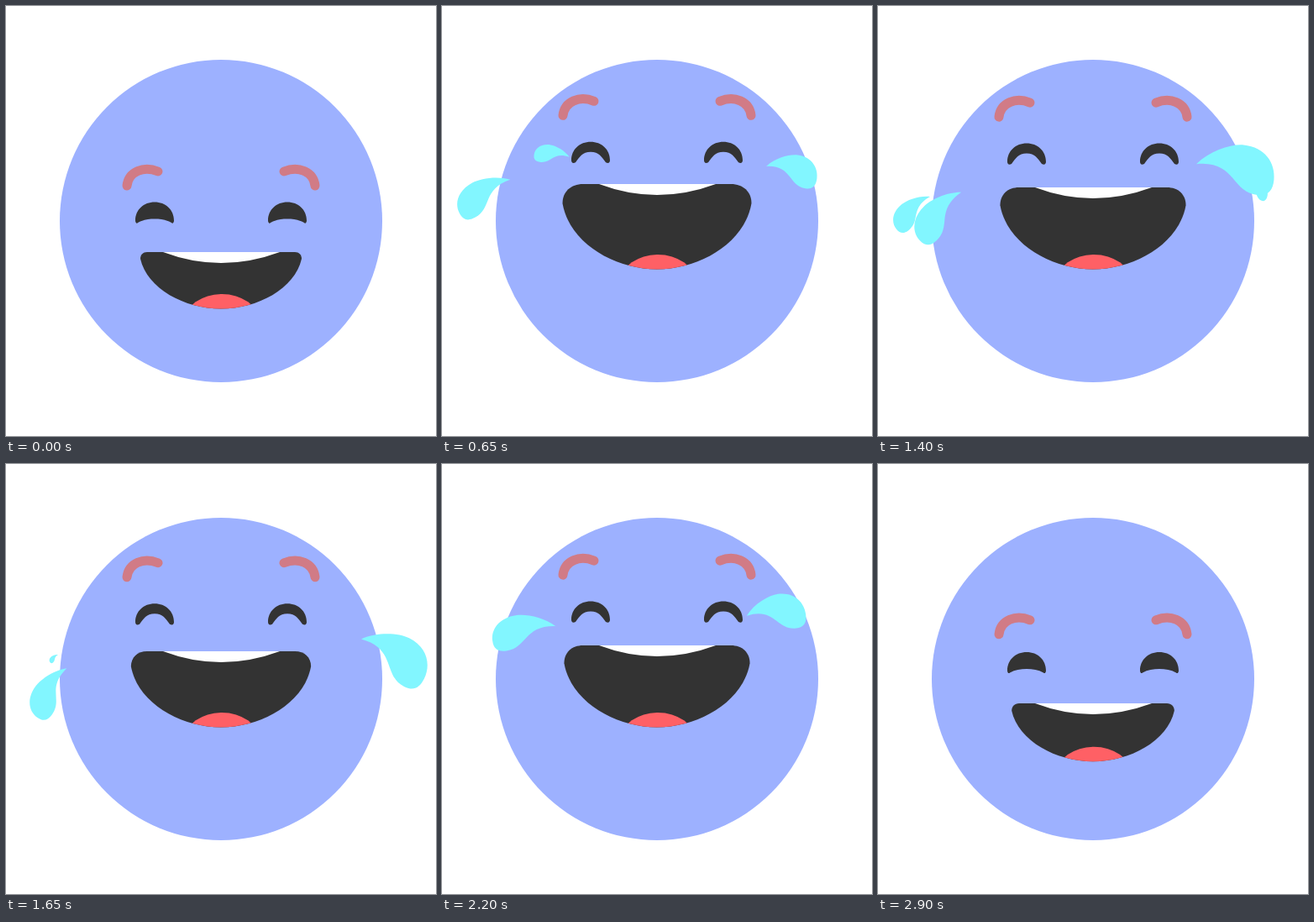
Recreate the animation shown at these times as an HTML page. Size 512x512 px, loop 2.95 s.

```html
<!DOCTYPE html>
<html lang="en">
<head>
<meta charset="utf-8">
<title>Laughing face</title>
<style>
  html, body { margin: 0; width: 100%; height: 100%; overflow: hidden; background: #fff; }
  svg { display: block; width: 100%; height: 100%; }
</style>
</head>
<body>
<svg viewBox="0 0 512 512">
  <defs>
    <clipPath id="mouthClip"><path id="mouthShape"/></clipPath>
    <path id="drop" d="M0 0C15-18 40-28 54-28C80-28 94-10 94 10C94 24 88 30 76 30C45 30 46-9 0 0Z"/>
    <g id="half">
      <path id="brow" d="M144 214C146 197 164 190 181 197" fill="none" stroke="#d17b86" stroke-width="11" stroke-linecap="round"/>
      <path id="eye" fill="#333"/>
    </g>
  </defs>
  <circle cx="256" cy="256" r="192" fill="#9db1ff"/>
  <use href="#half"/>
  <use href="#half" transform="matrix(-1 0 0 1 512 0)"/>
  <use href="#mouthShape" fill="#333"/>
  <g clip-path="url(#mouthClip)">
    <path id="teeth" d="M187 0Q256 26 326 0Z" fill="#fff"/>
    <ellipse id="tongue" cx="257" cy="14.5" rx="44" ry="32" fill="#ff6065"/>
  </g>
  <g id="tears" fill="#82f6ff"></g>
</svg>
<script>
const LOOP = 2950, STEP = 50;
const LAUGH_START = 300, LAUGH_END = 2300, LAUGH_PERIOD = 400;
const EYE_CORNER = { out: 103, y: 179 };
const LEFT = { side: -1, turn: 1.4, slim: .85 };
const RIGHT = { side: 1, turn: 1.1, slim: 1 };

const $ = id => document.getElementById(id);
const mix = (a, b, u) => a + (b - a) * u;
const clamp = u => Math.min(1, Math.max(0, u));
const ease = (t, from, to) => {
  const u = clamp((t - from) / (to - from));
  return u * u * (3 - 2 * u);
};
const shift = (id, y) => $(id).setAttribute("transform", `translate(0 ${y})`);

function makeTear(eye, { birth, life, reach, fall, size = .82 }) {
  const node = document.createElementNS("http://www.w3.org/2000/svg", "use");
  node.setAttribute("href", "#drop");
  $("tears").append(node);
  return { ...eye, node, birth, life, reach, fall, size };
}

const tears = [
  makeTear(LEFT, { birth: 150, life: 1000, reach: 83, fall: 32 }),
  makeTear(LEFT, { birth: 600, life: 1100, reach: 91, fall: 48 }),
  makeTear(LEFT, { birth: 900, life: 1280, reach: 83, fall: 66 }),
  makeTear(LEFT, { birth: 2080, life: 680, reach: 97, fall: 78 }),
  makeTear(RIGHT, { birth: 350, life: 1200, reach: 82, fall: 36, size: .66 }),
  makeTear(RIGHT, { birth: 1200, life: 900, reach: 74, fall: 34, size: 1 }),
  makeTear(RIGHT, { birth: 2150, life: 620, reach: 89, fall: 41, size: .77 })
];

// A tear pops out at the eye corner, flies outwards while tilting, then shrinks away.
function drawTear({ node, side, turn, slim, birth, life, reach, fall, size }, t) {
  const age = (t - birth) / life;
  const alive = age > 0 && age < 1;
  node.style.display = alive ? "" : "none";
  if (!alive) return;
  const flight = ease(age, 0, .65);
  const x = 256 + side * (EYE_CORNER.out + reach * flight);
  const y = EYE_CORNER.y + fall * flight;
  const scale = size * clamp(age * 12) * (1 - age ** 4);
  const slope = Math.atan2(fall, reach) * 180 / Math.PI;
  const tilt = mix(-10, slope * turn, Math.sin(flight * Math.PI / 2));
  node.setAttribute("transform",
    `translate(${x} ${y}) scale(${side * scale} ${scale}) rotate(${tilt}) scale(1 ${slim})`);
}

function eyePath(open) {
  const end = mix(197, 195, open), bend = mix(191, 190, open), inner = mix(184, 187, open);
  const low = mix(21, 18, open), arch = mix(20, 12, open);
  const flip = x => 354 - x;
  return `M154 22C154 9 164 0 177 0S200 9 200 22C200 25 198 26 ${end} 24.5` +
    `C${bend} ${low} ${inner} ${arch} 177 ${arch}` +
    `S${flip(bend)} ${low} ${flip(end)} 24.5C156 26 154 25 154 22Z`;
}

function mouthPath(top, bottom) {
  const grown = bottom - top - 67.5;
  const half = 96 + grown * .485, corner = 8 + grown * .44;
  const side = top + corner, low = mix(side, bottom, .6);
  const right = 256 + half, left = 256 - half, flat = 88;
  const round = mix(flat, half, .6), shoulder = top + corner * .4;
  return `M${256 - flat} ${top}H${256 + flat}` +
    `C${256 + round} ${top} ${right} ${shoulder} ${right} ${side}` +
    `C${right - 8} ${low} ${256 + half * .45} ${bottom} 256 ${bottom}` +
    `S${left + 8} ${low} ${left} ${side}` +
    `C${left} ${shoulder} ${256 - round} ${top} ${256 - flat} ${top}Z`;
}

function draw(t) {
  const rise = ease(t, 0, LAUGH_START);
  const lift = rise - ease(t, 2395, 3050);
  const gape = rise - ease(t, LAUGH_END, 2995);
  const open = rise - ease(t, LAUGH_END, 2500);
  const laughing = t > LAUGH_START && t < LAUGH_END;
  const bounce = laughing ? Math.abs(Math.sin(Math.PI * (t - LAUGH_START) / LAUGH_PERIOD)) ** 3 : 0;

  const bottom = 360.5 - 47 * lift;
  const top = Math.round(bottom - (67.5 + 34.5 * gape - 14 * bounce));
  shift("brow", 6 * bounce - 84 * lift);
  shift("eye", 233.5 + 6 * bounce - 72 * lift);
  $("eye").setAttribute("d", eyePath(open));
  $("mouthShape").setAttribute("d", mouthPath(top, bottom));
  shift("teeth", top);
  shift("tongue", bottom);
  tears.forEach(tear => drawTear(tear, t));
}

const start = performance.now();
function tick() {
  const t = (performance.now() - start) % LOOP;
  draw(Math.floor(t / STEP) * STEP);
  requestAnimationFrame(tick);
}
tick();
</script>
</body>
</html>
```
